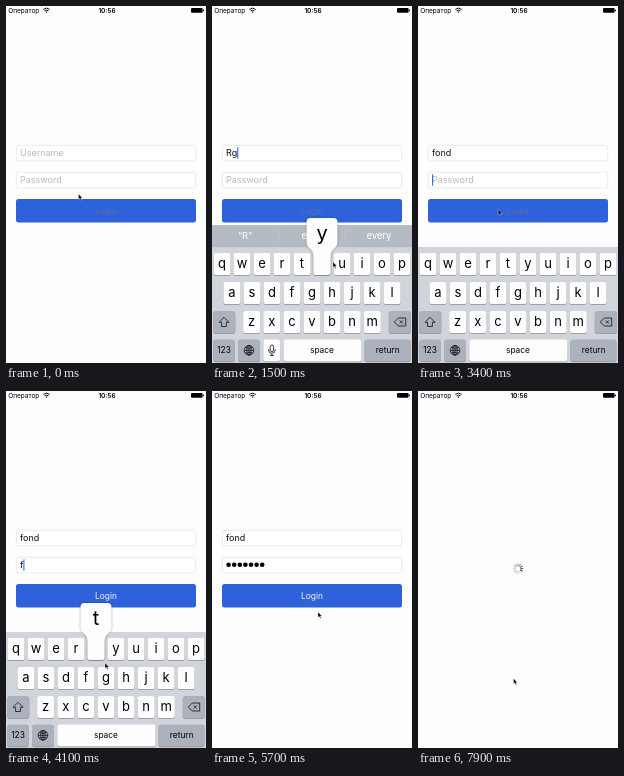
An HTML page for the animation above (8 s loop, 200 by 357 pixels).

```html
<!DOCTYPE html>
<html lang="en">
<head>
<meta charset="utf-8">
<title>Login form</title>
<style>
  html, body { margin: 0; width: 100%; height: 100%; overflow: hidden; background: #fdfdfd; }
  svg { display: block; width: 100vw; height: 100vh; font-family: Inter, Roboto, sans-serif; }
  text { white-space: pre; }
  .mid { text-anchor: middle; }
  .field { fill: #fff; stroke: #dedede; stroke-width: .6; }
  .entry { font-size: 9px; fill: #111; }
  .hint { fill: #b9b9be; }
  .caret { fill: #3f6be0; }
  .letter { font-size: 13px; }
  .label { font-size: 8.4px; }
  .bar text { font-size: 9.3px; fill: #fff; }
  .icon { fill: none; stroke: #111; stroke-width: .8; stroke-linejoin: round; }
  #popup { filter: drop-shadow(0 .6px 1px rgba(0, 0, 0, .35)); }
</style>
</head>
<body>
<svg viewBox="0 0 200 357" preserveAspectRatio="none">
  <rect width="200" height="357" fill="#fdfdfd"/>

  <g id="form">
    <rect class="field" x="10.3" y="139.3" width="179.4" height="15.6" rx="2.5"/>
    <rect class="field" x="10.3" y="166.3" width="179.4" height="15.6" rx="2.5"/>
    <rect id="mark" x="12.5" y="140.8" height="12.4" fill="#bdd7ef"/>
    <text id="user" class="entry" x="14" y="149.9"></text>
    <g id="dots"></g>
    <text id="pass" class="entry" x="14" y="176.9"></text>
    <rect id="caret" class="caret" width="1.1" height="11.4"/>
    <rect id="button" x="10" y="193" width="180" height="23.5" rx="2.5" fill="#2f62da"/>
    <text id="login" class="mid" x="100" y="207.8" font-size="8.4">Login</text>
  </g>

  <g id="spinner" transform="translate(100 177.6)" stroke="#333" stroke-width="1" stroke-linecap="round"></g>

  <g id="keyboard">
    <rect y="241" width="200" height="116" fill="#d1d4da"/>
    <g id="bar" class="bar">
      <rect y="219" width="200" height="22.2" fill="#b5bbc4"/>
      <path d="M66.5 222v16M133.5 222v16" stroke="#c6cbd2" stroke-width=".6"/>
      <rect id="choice" x="66.5" y="219" width="67.5" height="22.2" fill="#e3e6ea"/>
      <text class="mid" x="33" y="233.2"></text>
      <text class="mid" x="100" y="233.2"></text>
      <text class="mid" x="167" y="233.2"></text>
    </g>
    <g id="keys"></g>
    <path id="shift" d="M12 311.3l5 5h-2.6v4.2h-4.8v-4.2h-2.6z" stroke="#111" stroke-width=".8" stroke-linejoin="round"/>
    <path class="icon" d="M182.3 316l4-4h7.4v8h-7.4zM187.7 314.4l3.2 3.2m0-3.2l-3.2 3.2"/>
    <g class="icon">
      <circle cx="37" cy="344.3" r="4.8"/>
      <ellipse cx="37" cy="344.3" rx="2.2" ry="4.8"/>
      <path d="M32.2 344.3h9.6M37 339.5v9.6M33.2 341.5q3.8 1.6 7.6 0M33.2 347.1q3.8-1.6 7.6 0"/>
    </g>
    <g id="mic" class="icon">
      <rect x="58.2" y="339" width="3.4" height="6.6" rx="1.7"/>
      <path d="M56.6 343.2v.8a3.3 3.3 0 0 0 6.6 0v-.8M59.9 347.4v2M58 349.5h3.8"/>
    </g>
    <g id="popup">
      <path d="M-11.5-35h23q4 0 4 4v20c0 7-7 6-7 14v16q0 3-3 3h-11q-3 0-3-3v-16c0-8-7-7-7-14v-20q0-4 4-4z" fill="#fdfdfd"/>
      <text class="mid" y="-13" font-size="20"></text>
    </g>
  </g>

  <g id="status" font-size="6.5">
    <text x="2.2" y="6.7">Оператор</text>
    <text class="mid" x="101" y="6.7" font-weight="600">10:56</text>
    <g fill="none" stroke="#111" stroke-width="1">
      <path d="M37.3 3.4q3.2-2.6 6.4 0M38.6 4.9q1.9-1.5 3.8 0"/>
    </g>
    <path d="M39.5 5.8q1-.7 2 0l-1 1.2z"/>
    <rect x="185" y="2" width="11.6" height="4.8" rx="1"/>
    <rect x="197" y="3.5" width="1" height="1.8" rx=".5"/>
  </g>

  <path id="mouse" d="M0 0v5.3l1.2-1 .9 2 1-.4-.9-1.9h1.7z" fill="#080808" stroke="#fff" stroke-width=".3"/>
</svg>

<script>
const LOOP = 8000, HOLD = 150;
const USER = 'Rgyu', PICK = 'fond', PASS = 'ftgfhtg';
const USER_DOWN = [950, 1200, 1430, 1730];
const PASS_DOWN = [3850, 4030, 4240, 4430, 4620, 4800, 4980];
const PICKED = 2600, PASS_FOCUS = 3100, CLOSE = 5300;

// time, x, y of the pointer tip
const PATH = [
  [0, 72.5, 188], [300, 73, 192], [700, 77.5, 209.5], [950, 70, 256], [1100, 71, 257],
  [1220, 99, 283], [1330, 100, 284], [1500, 121, 256], [1900, 127, 257], [2350, 97, 229],
  [2620, 97, 229], [3000, 80, 174], [3200, 80, 175], [3800, 81, 284], [3970, 81, 284],
  [4100, 99, 272], [4260, 100, 284], [4440, 81, 284], [4630, 119, 284], [4800, 92, 258],
  [5000, 100, 284], [5250, 172, 342], [5330, 172, 342], [5700, 106, 221], [5900, 103, 207],
  [6350, 103, 207], [7150, 95.5, 279], [7400, 95.5, 287.5], [8000, 95.5, 287.5]
];

const $ = id => document.getElementById(id);
const add = (parent, tag, attrs, text = '') => {
  const el = document.createElementNS('http://www.w3.org/2000/svg', tag);
  for (const k in attrs) el.setAttribute(k, attrs[k]);
  el.textContent = text;
  return parent.appendChild(el);
};
const show = (el, on) => el.style.display = on ? '' : 'none';
const ramp = (t, a, b) => Math.min(1, Math.max(0, (t - a) / (b - a)));
const ease = p => p * p * (3 - 2 * p);
const within = (t, a, b) => t >= a && t < b;

function addKey(x, y, w, fill = '#fdfdfd') {
  const shade = add($('keys'), 'rect', { x, y: y + .8, width: w, height: 22, rx: 2.6, fill: '#8c9097' });
  const face = add($('keys'), 'rect', { x, y, width: w, height: 22, rx: 2.6, fill });
  return [shade, face];
}

const keyAt = {}, letters = [];
['qwertyuiop', 'asdfghjkl', 'zxcvbnm'].forEach((row, r) => {
  const y = 247 + r * 29;
  [...row].forEach((ch, i) => {
    const x = [10, 20, 39.7][r] + i * (r === 2 ? 20.1 : 20);
    addKey(x - 8.5, y, 17);
    keyAt[ch] = [x, y];
    letters.push([ch, add($('keys'), 'text', { class: 'mid letter', x, y: y + 15.2 })]);
  });
});
const GREY = '#abb2bd';
const shiftFace = addKey(1.3, 305, 22, GREY)[1];
addKey(176.8, 305, 22, GREY);
addKey(1.3, 333.4, 21.5, GREY);
addKey(26, 333.4, 22, GREY);
const micKey = addKey(51.3, 333.4, 17);
const spaceKey = addKey(71.5, 333.4, 78);
addKey(152.5, 333.4, 46, GREY);
const label = (x, s) => add($('keys'), 'text', { class: 'mid label', x, y: 347 }, s);
label(12, '123');
const spaceText = label(110, 'space');
label(175.7, 'return');

const dots = [...PASS].map((_, i) =>
  add($('dots'), 'circle', { cx: 16.6 + i * 5.6, cy: 173.7, r: 2.3 }));
const spokes = Array.from({ length: 12 }, (_, i) =>
  add($('spinner'), 'path', { d: 'M0-2.8v-2', transform: `rotate(${i * 30})` }));
const tips = $('bar').querySelectorAll('text');

const typed = (t, downs) => downs.filter(d => t >= d + HOLD).length;

function pressedKey(t) {
  for (const [word, downs] of [[USER, USER_DOWN], [PASS, PASS_DOWN]]) {
    const i = downs.findIndex(d => within(t, d, d + HOLD));
    if (i >= 0) return word[i];
  }
}

function suggestions(t) {
  if (t < 1100 || t >= PICKED) return ['I', 'The', 'I’m'];
  if (t < 1650) return [`“${USER[0]}”`, 'even', 'every'];
  if (t < 1960) return [`“${USER.slice(0, 3)}”`, 'even', 'every'];
  return [`“${USER}”`, PICK, 'etymology'];
}

function setEntry(el, text, hint) {
  el.textContent = text || hint;
  el.classList.toggle('hint', !text);
}

function drawForm(t) {
  const n = typed(t, USER_DOWN), m = typed(t, PASS_DOWN);
  const name = t < PICKED ? USER.slice(0, n) : PICK;
  setEntry($('user'), name, 'Username');

  // the newest password letter stays readable for a moment
  const plain = m > 0 && t < Math.min(PASS_DOWN[m - 1] + 900, CLOSE);
  const masked = plain ? m - 1 : m;
  dots.forEach((d, i) => show(d, i < masked));
  setEntry($('pass'), plain ? PASS[m - 1] : m ? ' ' : '', 'Password');
  $('pass').setAttribute('x', 14 + masked * 5.6);

  const inPass = t >= PASS_FOCUS;
  const userEnd = 14 + (name ? $('user').getComputedTextLength() : 0);
  const passEnd = 14 + masked * 5.6 + (plain ? $('pass').getComputedTextLength() : 0);
  const edits = [200, ...USER_DOWN.map(d => d + HOLD), PICKED, PASS_FOCUS, ...PASS_DOWN.map(d => d + HOLD)];
  const last = edits.filter(e => e <= t).pop() ?? 0;
  show($('caret'), within(t, 100, CLOSE) && (t - last) % 1000 < 650);
  $('caret').setAttribute('x', inPass ? passEnd : userEnd);
  $('caret').setAttribute('y', inPass ? 168.3 : 141.3);

  show($('mark'), within(t, 1960, PICKED));
  $('mark').setAttribute('width', userEnd - 12.5);
  $('login').setAttribute('fill', m ? '#f4f7ff' : '#526fb4');
  $('login').style.opacity = within(t, 6250, 6400) ? .4 : 1;
  $('form').style.opacity = 1 - ramp(t, 6400, 6650);
}

function drawKeyboard(t) {
  const up = ease(ramp(t, 100, 480)) - ease(ramp(t, CLOSE, 5650));
  show($('keyboard'), up > 0);
  $('keyboard').setAttribute('transform', `translate(0 ${(1 - up) * 138})`);

  const secret = t >= PASS_FOCUS;
  show($('bar'), !secret);
  [$('mic'), ...micKey].forEach(el => show(el, !secret));
  spaceKey.forEach(el => {
    el.setAttribute('x', secret ? 51.3 : 71.5);
    el.setAttribute('width', secret ? 98.2 : 78);
  });
  spaceText.setAttribute('x', secret ? 100 : 110);

  const caps = t < USER_DOWN[0] + HOLD;
  letters.forEach(([ch, el]) => el.textContent = caps ? ch.toUpperCase() : ch);
  shiftFace.setAttribute('fill', caps ? '#fdfdfd' : GREY);
  $('shift').setAttribute('fill', caps ? '#111' : 'none');

  const offer = within(t, 1960, PICKED);
  show($('choice'), offer);
  suggestions(t).forEach((s, i) => tips[i].textContent = s);
  tips[1].style.fill = offer ? '#1a78e0' : '';

  const key = pressedKey(t);
  show($('popup'), key);
  if (key) {
    $('popup').setAttribute('transform', `translate(${keyAt[key.toLowerCase()]})`);
    $('popup').lastElementChild.textContent = key;
  }
}

function drawSpinner(t) {
  $('spinner').style.opacity = ramp(t, 6450, 6650);
  const head = Math.floor(t * 12 / 1000) + 6;
  spokes.forEach((s, i) => {
    const age = (((head - i) % 12) + 12) % 12;
    s.style.opacity = Math.max(.25, 1 - age * .11);
  });
}

function drawMouse(t) {
  const i = PATH.findIndex(p => p[0] > t);
  const [a, x0, y0] = PATH[i - 1], [b, x1, y1] = PATH[i];
  const p = ease(ramp(t, a, b));
  $('mouse').setAttribute('transform', `translate(${x0 + (x1 - x0) * p} ${y0 + (y1 - y0) * p})`);
}

function draw() {
  const t = (performance.now() - start) % LOOP;
  drawForm(t);
  drawKeyboard(t);
  drawSpinner(t);
  drawMouse(t);
  requestAnimationFrame(draw);
}
const start = performance.now();
draw();
</script>
</body>
</html>
```
